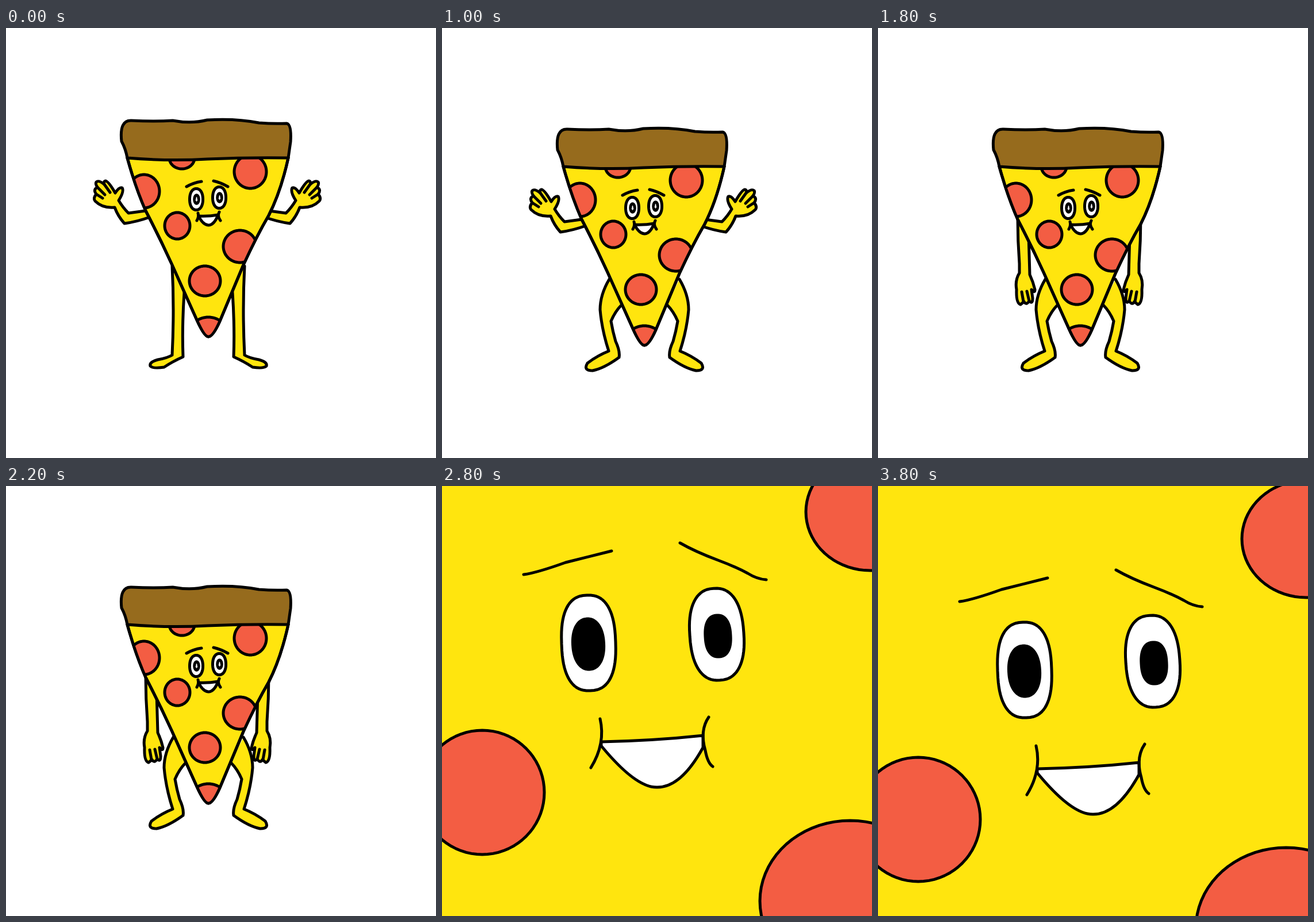
Animation of 748x748 px, one loop 4000 ms. Source, as an HTML page:

```html
<!DOCTYPE html>
<html lang="en">
<head>
<meta charset="utf-8">
<title>Bouncing pizza slice</title>
<style>
  html, body { margin: 0; width: 100%; height: 100%; overflow: hidden; background: #fff; }
  svg { display: block; width: 100%; height: 100%; }
  path { stroke: #000; stroke-width: 5; stroke-linecap: round; stroke-linejoin: round; }
</style>
</head>
<body>
<svg id="stage" viewBox="0 0 748 748"></svg>
<script>
const YELLOW = '#ffe50e', RED = '#f35d43', BROWN = '#966b1d', WHITE = '#fff', BLACK = '#000';
const LOOP = 4000, BEAT = 200, ARMS_DROP = 1400, ZOOM = 2800;
const stage = document.getElementById('stage');

function add(parent, tag, attrs = {}) {
  const el = document.createElementNS('http://www.w3.org/2000/svg', tag);
  for (const key in attrs) el.setAttribute(key, attrs[key]);
  return parent.appendChild(el);
}

const draw = (parent, d, fill = 'none') => add(parent, 'path', { d, fill });

// Superellipse: power 2 is an ellipse, higher powers are boxier.
function oval(parent, fill, cx, cy, rx, ry, power = 2, tilt = 0) {
  const bend = v => Math.sign(v) * Math.abs(v) ** (2 / power);
  const points = Array.from({ length: 72 }, (_, i) => {
    const angle = i * Math.PI / 36;
    return [cx + rx * bend(Math.cos(angle)), cy + ry * bend(Math.sin(angle))];
  });
  const el = draw(parent, `M${points.join('L')}Z`, fill);
  el.setAttribute('transform', `rotate(${tilt} ${cx} ${cy})`);
  return el;
}

// Draws a left limb and its reflection; sum is twice the mirror axis.
function limbs(parent, sum, outline, creases = '') {
  const pair = add(parent, 'g');
  for (const transform of ['', `translate(${sum} 0) scale(-1 1)`]) {
    const side = add(pair, 'g', { transform });
    draw(side, outline, YELLOW);
    if (creases) draw(side, creases);
  }
  return pair;
}

// Whole figure
const figure = add(stage, 'g');

const straightLegs = limbs(figure, 704,
  `M289,414 Q293,490 289,569 Q281,574 264,577 Q249,581 251,588
   Q256,593 275,590 Q290,580 308,572 Q306,520 310,460`);
const bentLegs = limbs(figure, 704,
  `M291,437 Q275,464 275,490 Q278,525 290,562 Q270,570 253,583 Q245,596 262,596
   Q282,592 308,573 Q310,562 302,545 Q297,528 294,510 Q301,493 313,481`);

const upper = add(figure, 'g');

const raisedArms = limbs(upper, 700,
  `M250,317 L213,322 Q203,312 196,300 Q206,284 202,278 Q197,276 190,287 Q178,266 173,266
   Q169,267 171,272 Q161,264 157,268 Q155,271 159,277 Q151,281 157,289 Q151,296 155,301
   Q168,314 189,312 Q195,328 206,340 Q228,337 250,329`,
  'M171,272 L181,286 M159,277 L172,290 M157,289 L168,296');
const loweredArms = limbs(upper, 700,
  `M243,315 Q243,355 246,395 L246,411 Q238,424 241,440 Q240,464 248,466 L254,461
   Q258,468 263,460 Q269,466 269,455 L267,440 Q273,447 273,440 Q270,427 264,414 L262,345`,
  'M250,444 L253,461 M259,443 L263,460');

const slice = `M211,226 Q225,277 243,318 Q266,362 288,410 L332,508 Q345,537 352,537
  Q360,537 372,510 L413,412 Q436,362 457,326 Q478,285 491,226`;
draw(add(stage, 'clipPath', { id: 'slice' }), slice);
draw(upper, slice, YELLOW);
const toppings = add(upper, 'g', { 'clip-path': 'url(#slice)' });
for (const [x, y, rx, ry] of [
  [306, 226, 22, 19], [425, 250, 28, 29], [240, 284, 27, 29], [298, 344, 22, 23],
  [407, 380, 29, 28], [346, 440, 27, 26], [352, 530, 32, 27]
]) oval(toppings, RED, x, y, rx, ry);
draw(upper, slice);
draw(upper, `M211,226 Q208,210 201,197 Q197,160 218,161 Q260,163 290,161 Q322,167 350,160
  Q400,157 440,165 Q465,167 488,166 Q497,167 495,198 L491,226 Q420,225 350,228 Q285,232 211,226Z`, BROWN);

draw(upper, 'M314,276 Q326,269 340,267 M361,266 Q374,269 386,276');
for (const [x, y] of [[331, 298], [371, 295]]) {
  oval(upper, WHITE, x, y, 11.5, 18.5, 2.2);
  oval(upper, WHITE, x + 0.5, y, 3.7, 7.2);
}
draw(upper, 'M335,327 Q352,328 369,325 Q362,343 352,343 Q342,342 335,327Z', WHITE);
draw(upper, 'M334,322 Q336,328 332,335 M371,320 Q367,327 373,335');

// Face close-up
const closeUp = add(stage, 'g');
add(closeUp, 'rect', { width: 748, height: 748, fill: YELLOW });
const face = add(closeUp, 'g');
oval(face, RED, 745, 45, 112, 102);
oval(face, RED, 70, 533, 108, 108);
oval(face, RED, 710, 722, 157, 140);
draw(face, 'M142,154 Q165,151 215,133 L295,113');
draw(face, 'M414,99 Q440,114 480,129 Q512,141 532,152 Q548,162 564,163');
oval(face, WHITE, 255, 273, 47, 83, 2.5, -2);
oval(face, WHITE, 478, 258, 47, 80, 2.4, -4);
oval(face, BLACK, 254.5, 275, 27, 44, 2.2, -3);
oval(face, BLACK, 480, 261, 22, 36, 2.4, -3);
draw(face, 'M277,445 Q370,443 454,434 L454,455 Q416,524 375,524 Q338,526 277,452Z', WHITE);
draw(face, 'M275,405 Q285,448 259,490 M464,402 Q448,425 458,460 Q462,482 471,488');

const show = (el, on) => el.style.display = on ? '' : 'none';
const shift = (el, y) => el.setAttribute('transform', `translate(0 ${y})`);

function render(ms) {
  const time = ms % LOOP;
  const down = Math.floor(time / BEAT) % 2;
  show(figure, time < ZOOM);
  show(closeUp, time >= ZOOM);
  show(raisedArms, time < ARMS_DROP);
  show(loweredArms, time >= ARMS_DROP);
  show(straightLegs, !down);
  show(bentLegs, down);
  shift(upper, down * 15);
  shift(face, down * 47);
}

const start = performance.now();
function tick() {
  render(performance.now() - start);
  requestAnimationFrame(tick);
}
tick();
</script>
</body>
</html>
```
